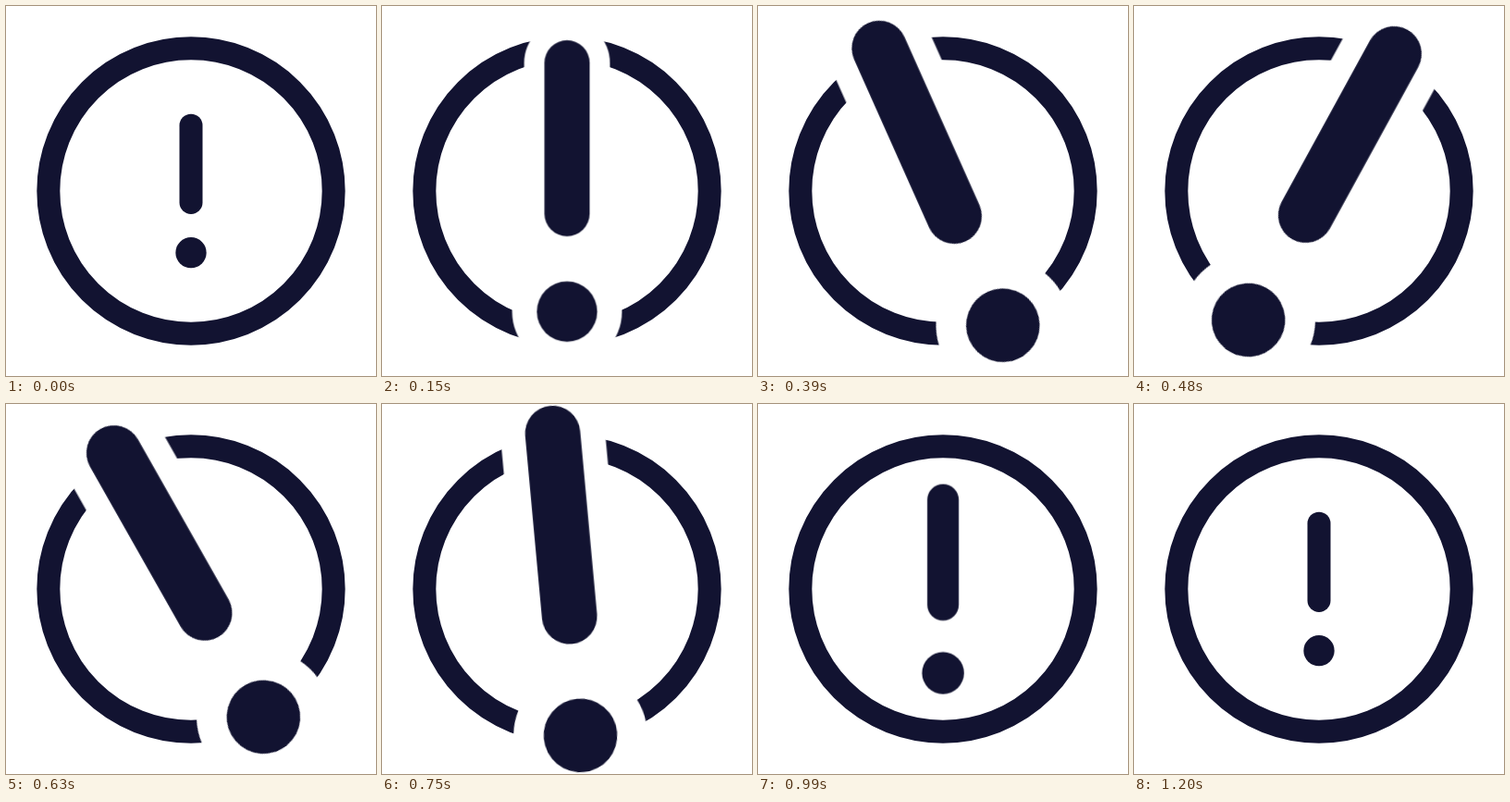
An HTML page for the animation above (1230 ms loop, 400 by 400 pixels).

```html
<!DOCTYPE html>
<html lang="en">
<head>
<meta charset="utf-8">
<title>Alert icon</title>
<style>
  html, body { margin: 0; width: 100%; height: 100%; overflow: hidden; background: #fff; }
  svg { display: block; width: 100vw; height: 100vh; }
  .ink { stroke: #121331; fill: none; stroke-width: 25; stroke-linecap: round; }
  .gap { stroke: #fff; fill: none; stroke-width: 47.4; stroke-linecap: round; }
  .ink.dot { fill: #121331; stroke: none; }
  .gap.dot { fill: #fff; stroke: none; }
  .swing, .grow { transform-origin: 0 0; animation: 1230ms infinite; }
  .swing { animation-name: swing; animation-timing-function: cubic-bezier(.333, 0, .667, 1); }
  .grow { animation-name: grow; }

  @keyframes swing {
    0%, 19.5% { transform: rotate(0deg); }
    29.8% { transform: rotate(-30deg); }
    40% { transform: rotate(30deg); }
    50.2% { transform: rotate(-30deg); }
    65%, 100% { transform: rotate(0deg); }
  }
  @keyframes grow {
    0% { transform: scale(1); animation-timing-function: cubic-bezier(.333, 0, .667, 1); }
    19.5% { transform: scale(2.385); }
    64.9% { transform: scale(2.385); animation-timing-function: cubic-bezier(.33, 0, .44, 1); }
    92.7%, 100% { transform: scale(1); }
  }
</style>
</head>
<body>
<svg viewBox="-200 -200 400 400">
  <circle class="ink" r="154.17"/>
  <g class="swing">
    <g class="grow">
      <!-- white margin that cuts the ring -->
      <path class="gap" d="M0-70.83V12.5"/>
      <circle class="gap dot" cy="66.67" r="30.35"/>
      <path class="ink" d="M0-70.83V12.5"/>
      <circle class="ink dot" cy="66.67" r="16.67"/>
    </g>
  </g>
</svg>
</body>
</html>
```
